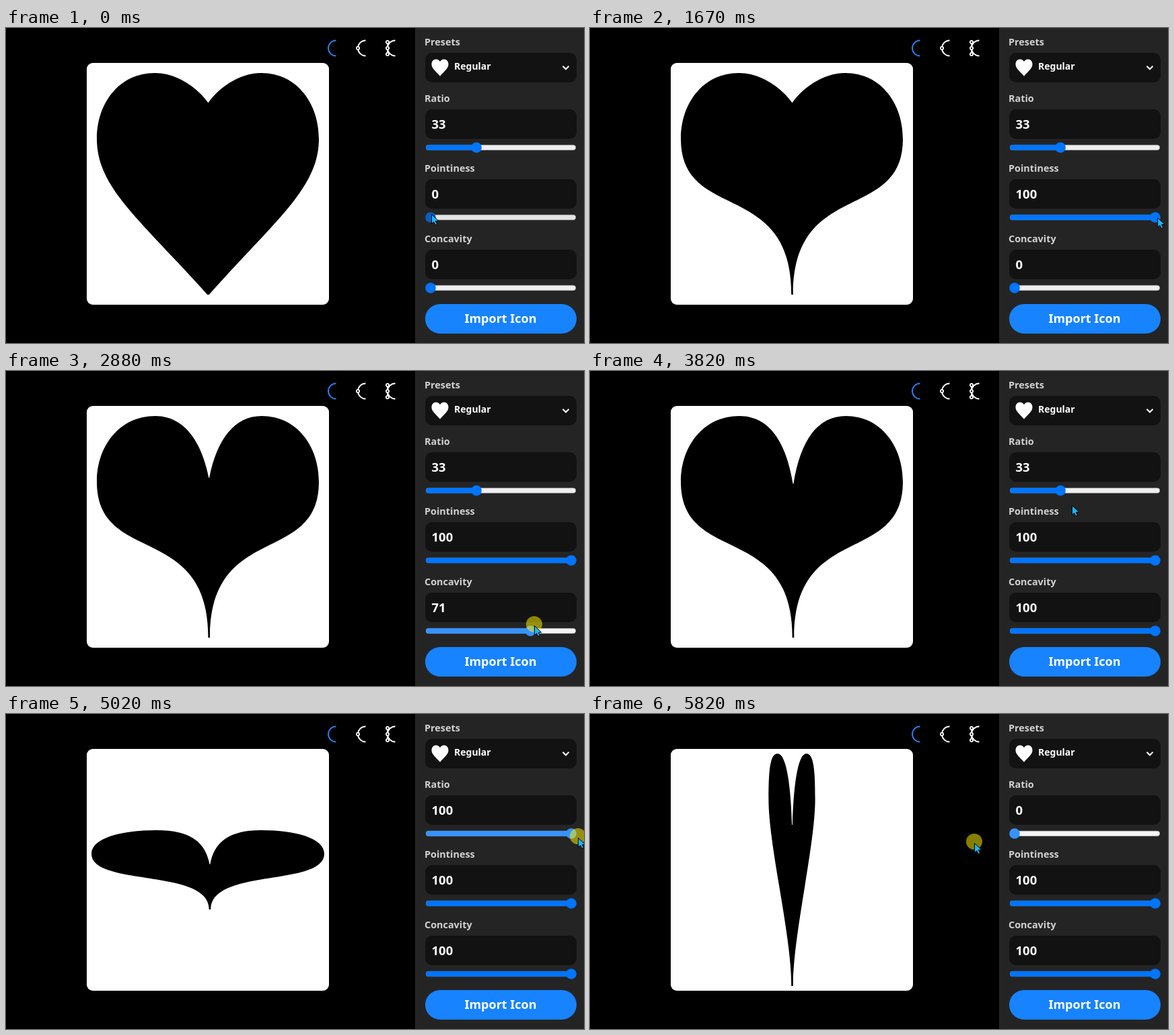
An HTML page that plays this animation: 859 by 469 pixels, repeating every 6.55 s.

```html
<!DOCTYPE html>
<html lang="en">
<head>
<meta charset="utf-8">
<title>Heart editor</title>
<style>
  html, body { margin: 0; width: 100%; height: 100%; overflow: hidden; background: #000; }
  svg { display: block; width: 100%; height: 100%; font-family: "Noto Sans", "Open Sans", sans-serif; font-weight: 700; fill: #fff; }
  .label { font-size: 14.4px; font-weight: 600; fill: #d2d2d2; }
  .value { font-size: 18.5px; }
  .line { fill: none; stroke: #fff; stroke-width: 2; }
  .knot { fill: #000; stroke: #fff; stroke-width: 1.8; }
</style>
</head>
<body>
<svg viewBox="0 0 859 469">
  <rect width="859" height="469" fill="#000"/>
  <rect x="120" y="52" width="360" height="360" rx="9"/>
  <path id="heart" fill="#000"/>

  <path class="line" style="stroke:#2a7de8" d="M490.5 18.5a11.5 11.5 0 0 0 0 23"/>
  <path class="line" d="M534.5 18.5a11.5 11.5 0 0 0 0 23"/>
  <circle class="knot" cx="523" cy="30" r="2.1"/>
  <path class="line" d="M578.5 18.5a11.5 11.5 0 0 0 0 23M567 21V39"/>
  <circle class="knot" cx="567" cy="21" r="2.1"/>
  <circle class="knot" cx="567" cy="30" r="2.1"/>
  <circle class="knot" cx="567" cy="39" r="2.1"/>

  <rect x="608" width="251" height="469" fill="#242424"/>
  <text class="label" x="622" y="26">Presets</text>
  <rect x="623" y="37" width="225" height="44" rx="10" fill="#121212"/>
  <path id="icon"/>
  <text x="666" y="62" font-size="14">Regular</text>
  <path class="line" d="M827.5 56.7L832 61.3L836.5 56.7"/>
  <g id="fields"></g>
  <rect x="623" y="411" width="225" height="44" rx="22" fill="#1783ff"/>
  <text x="735" y="439" font-size="18" text-anchor="middle">Import Icon</text>

  <g id="pointer">
    <circle id="press" cy="-2" r="12" fill="#fff000" fill-opacity=".53"/>
    <path d="M.5 .5V14.5L3.7 11.6L6 16.4L8.6 15.2L6.4 10.6L10.8 10.2Z" fill="#1fb6fb" stroke="#000"/>
  </g>
</svg>
<script>
const LOOP = 6550, STEP = 66.93, REGULAR = .326;
const $ = id => document.getElementById(id);
const mix = (a, b, k) => a + (b - a) * k;
const clamp = k => Math.min(1, Math.max(0, k));
const ramp = (t, from, to) => clamp((t - from) / (to - from));
const linear = k => k;
const easeOut = k => 1 - (1 - k) ** 4;

const MOVES = [
  { from: 70, to: 850, x: 850, y: 279, ease: linear },
  { from: 1670, to: 2080, x: 633, y: 381, ease: easeOut },
  { from: 2290, to: 3130, x: 850, y: 378, ease: linear },
  { from: 3480, to: 4200, x: 704, y: 184, ease: easeOut },
  { from: 4550, to: 5020, x: 850, y: 184, ease: linear },
  { from: 5420, to: 5820, x: 571, y: 192, ease: linear }
];

function pointerAt(t) {
  let x = 632, y = 277;
  for (const m of MOVES) {
    const k = m.ease(ramp(t, m.from, m.to));
    x = mix(x, m.x, k);
    y = mix(y, m.y, k);
  }
  return [x, y];
}

// Two mirrored halves in a unit box: u runs from the axis outwards, v downwards
function heartPath(ratio, point, concave, cx = 300, cy = 232, zoom = 1) {
  const wide = ramp(ratio, REGULAR, 1), thin = ramp(ratio, REGULAR, 0);
  const c = Math.sqrt(concave), p = 1 - (1 - point) ** 2;

  const aspect = 1 + 1.93 * wide - .8 * thin;
  const size = (330 + 16 * (wide + thin)) * zoom;
  const w = size * Math.min(1, aspect) / 2, h = size * Math.min(1, 1 / aspect);

  const notch = mix(.133, .306, c) + .124 * wide;
  const peak = .479 - .03 * wide + .14 * thin;
  const side = .297 - .1 * thin;
  const shift = (.5 + 1.5 * c + wide - 1.5 * thin) * zoom;

  const half = sign => {
    const at = (u, v, pad = 0) => [
      cx + sign * (u * w + pad * zoom) + shift * (1 - u),
      cy + (v - .5) * h
    ].map(n => n.toFixed(2)).join(" ");
    return [
      at(0, notch, .4),
      at(.091 - .024 * c - .03 * wide, notch * mix(.53, .35, c)),
      at(peak * (.57 - .1 * c - .1 * wide), 0),
      at(peak, 0),
      at(.8 - .05 * wide + .14 * thin, 0),
      at(1, side * (.46 - .12 * wide - .1 * thin)),
      at(1, side),
      at(1, mix(.518, .676, p) + .04 * wide - .28 * thin),
      at(mix(.606, 0, point), mix(.661, .476, point) + .31 * thin, .8),
      at(0, 1, 1.3)
    ];
  };
  const right = half(1), left = half(-1).reverse();
  return `M${right[0]}C${right.slice(1)}L${left[0]}C${left.slice(1)}Z`;
}

const STYLES = {
  idle: { fill: "#0075ff", rail: "#efefef" },
  hover: { fill: "#0a60c4", rail: "#e5e5e5" },
  drag: { fill: "#3793ff", rail: "#f5f5f5" }
};

function makeField(name, y) {
  const g = document.createElementNS("http://www.w3.org/2000/svg", "g");
  g.setAttribute("transform", `translate(0 ${y})`);
  g.innerHTML = `<text class="label" x="622" y="-68">${name}</text>
    <rect x="623" y="-57" width="225" height="44" rx="10" fill="#121212"/>
    <text class="value" x="632.5" y="-28.5"></text>
    <rect x="624.3" y="-3.7" width="222.4" height="7.4" rx="3.7" stroke="#b2b2b2" stroke-width=".6"/>
    <rect x="624" y="-4" height="8" rx="4"/>
    <circle r="7.8"/>`;
  $("fields").append(g);
  const [, , text, rail, fill, thumb] = g.children;
  return (value, state) => {
    const x = 631 + 209 * value, style = STYLES[state];
    text.textContent = Math.round(value * 100);
    rail.setAttribute("fill", style.rail);
    fill.setAttribute("width", x - 624);
    fill.setAttribute("fill", style.fill);
    thumb.setAttribute("cx", x);
    thumb.setAttribute("fill", style.fill);
  };
}

const setRatio = makeField("Ratio", 178);
const setPoint = makeField("Pointiness", 282);
const setConcave = makeField("Concavity", 387);
$("icon").setAttribute("d", heartPath(REGULAR, 0, 0, 645, 59, 25 / 330));

const stateAt = (t, hover, down, up) =>
  t < hover || t >= up ? "idle" : t < down ? "hover" : "drag";

function draw(time) {
  // The picture advances in even steps, like a screen capture
  const t = Math.floor((time + 6) / STEP) * STEP;
  const ratio = mix(mix(REGULAR, 1, ramp(t, 4550, 5010)), 0, ramp(t, 5420, 5755));
  const point = ramp(t, 60, 893);
  const concave = ramp(t, 2285, 3120);
  const states = [stateAt(t, 4040, 4530, LOOP), stateAt(t, 0, 60, 1130), stateAt(t, 2060, 2270, 3210)];

  $("heart").setAttribute("d", heartPath(ratio, point, concave));
  setRatio(ratio, states[0]);
  setPoint(point, states[1]);
  setConcave(concave, states[2]);
  $("pointer").setAttribute("transform", `translate(${pointerAt(t)})`);
  $("press").setAttribute("visibility", states.includes("drag") ? "visible" : "hidden");
}

const start = performance.now();
function tick() {
  draw((performance.now() - start) % LOOP);
  requestAnimationFrame(tick);
}
tick();
</script>
</body>
</html>
```
